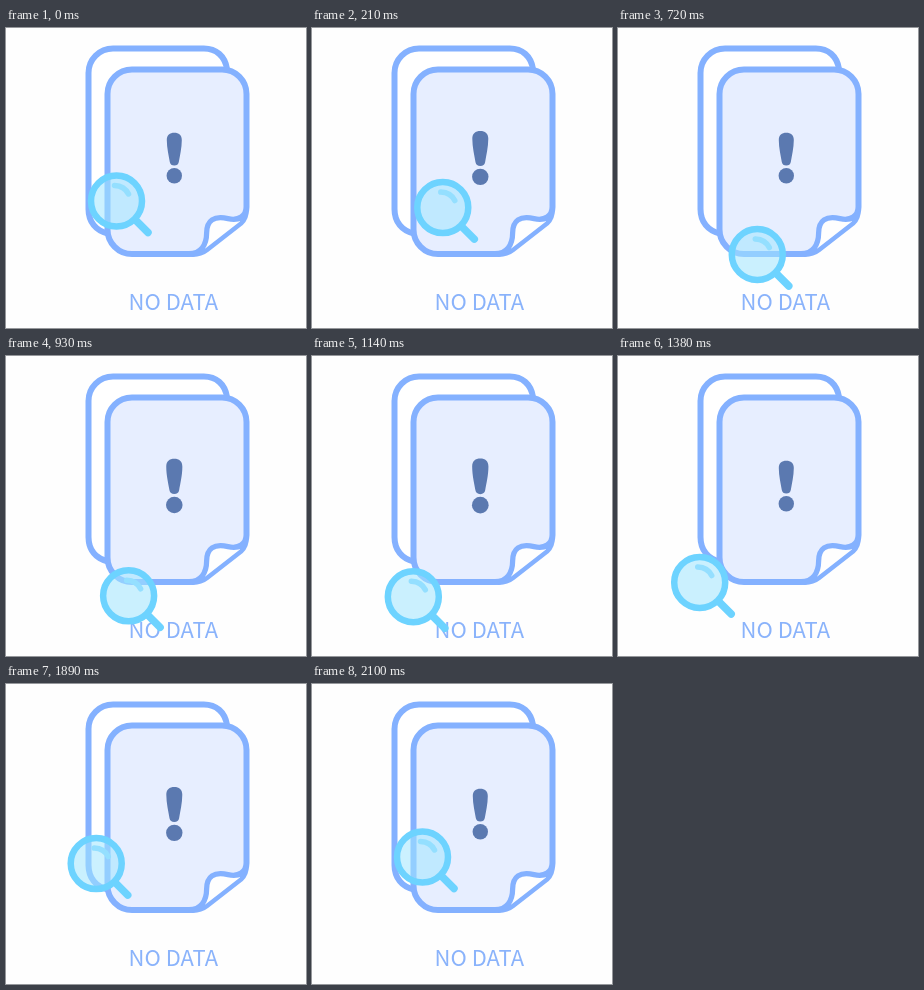
Animation, 300 px wide and 300 px high, one loop 2130 ms. Source, as an HTML page:

```html
<!DOCTYPE html>
<html lang="en">
<head>
<meta charset="utf-8">
<title>No data</title>
<style>
  html, body { margin: 0; width: 100%; height: 100%; overflow: hidden; background: #fefefe; }
  svg { display: block; width: 100vw; height: 100vh; }
  .sheet { stroke: #84b1ff; stroke-width: 6; stroke-linecap: round; stroke-linejoin: round; }
  text { font: 22px "Noto Sans CJK SC", "Noto Sans", sans-serif; fill: #8ab3fb; }
</style>
</head>
<body>
<svg viewBox="0 0 300 300">
  <path class="sheet" fill="#fff" d="M221 41C219 28 210 20.5 198 20.5H107A24.5 24.5 0 0 0 82.5 45V181C82.5 194 90 203 102 205.5"/>
  <path class="sheet" fill="#e7eeff" d="M126 41.5H216A24.5 24.5 0 0 1 240.5 66V179C240.5 188 233 193.500 222 191C208 187.500 201 193 201 205C201 217 195 226 183 226H126A24.500 24.500 0 0 1 101.500 201.500V66A24.500 24.500 0 0 1 126 41.500Z"/>
  <path class="sheet" fill="#fefefe" style="stroke-width:4.500" d="M240.500 181C240.500 189 233 193.500 222 191C208 187.500 201 193 201 205C201 217 195 226 184 226.500Q194 227.500 201 222L235 195.500Q241 190 240.500 181Z"/>
  <g id="mark" fill="#5b79b0">
    <path d="M-7.500-18C-7.500-23 -4.500-25.300 0-25.300S7.500-23 7.500-18C7.500-10 5.500-2 4.500 4Q3.800 7.500 0 7.500T-4.500 4C-5.500-2 -7.500-10 -7.500-18Z"/>
    <circle cy="17.700" r="7.700"/>
  </g>
  <text x="122.500" y="282">NO DATA</text>
  <g id="glass" fill="none" stroke="#6dd3ff" stroke-linecap="round">
    <path stroke-width="7.500" d="M19 19L31.500 31.500"/>
    <circle r="25.500" fill="#a0e6ff" fill-opacity=".55" stroke-width="6.500"/>
    <path stroke="#94dfff" stroke-width="5.500" d="M-2-15.500Q8-15 12-7"/>
  </g>
</svg>
<script>
  const LOOP = 2130, STEP = 30, TURN = 2100, PULSE = 700;
  const mark = document.getElementById("mark");
  const glass = document.getElementById("glass");

  function draw(ms) {
    const t = Math.floor((ms % LOOP) / STEP) * STEP;
    const angle = 2 * Math.PI * t / TURN;
    const x = 110.5 + 34.5 * Math.sin(angle);
    const y = 207.5 - 34.5 * Math.cos(angle);
    const scale = 1.05 - 0.05 * Math.cos(2 * Math.PI * t / PULSE);
    glass.setAttribute("transform", `translate(${x} ${y})`);
    mark.setAttribute("transform", `translate(168.3 130) scale(${scale})`);
  }

  let start;
  function tick(now) {
    start ??= now;
    draw(now - start);
    requestAnimationFrame(tick);
  }
  draw(0);
  requestAnimationFrame(tick);
</script>
</body>
</html>
```
